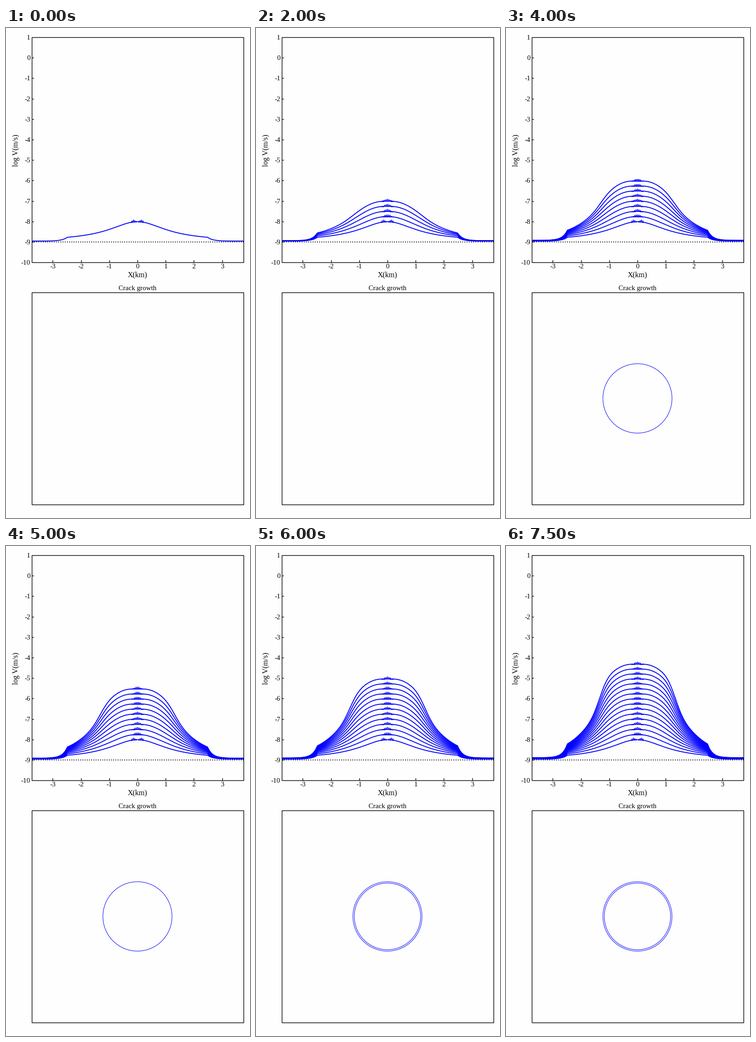
A matplotlib script that plays this animation: 529 px wide and 1058 px high, repeating every 8 s.

```python
import numpy as np
import matplotlib.pyplot as plt
from matplotlib.animation import FuncAnimation
from matplotlib.patches import Circle, Rectangle

W, H, DPI = 529, 1058, 64
PT = 72 / DPI                      # points per pixel
LEFT, RIGHT, TOP, BOTTOM = 55.5, 514.5, 19.9, 506.2
CX = (LEFT + RIGHT) / 2
KM = (RIGHT - LEFT) / 7.5
UNIT = (BOTTOM - TOP) / 11
BASE = TOP + 10 * UNIT             # height of log V = -9
FRAMES, STEP_MS = 16, 500
BLUE = "#0000ff"

plt.rcParams["font.family"] = "Liberation Serif"
fig = plt.figure(figsize=(W / DPI, H / DPI), dpi=DPI, facecolor="#fefefe")
ax = fig.add_axes([0, 0, 1, 1])
ax.set(xlim=(0, W), ylim=(H, 0))
ax.axis("off")


def label(x, y, text, size=15, **kw):
    kw = {"ha": "center", "va": "baseline", **kw}
    ax.text(x, y, text, fontsize=size * PT, color="black", **kw)


def stroke(xs, ys, width=1.4, color="black", **kw):
    return ax.plot(xs, ys, color=color, lw=width * PT, **kw)[0]


def box(top, bottom):
    return ax.add_patch(Rectangle((LEFT, top), RIGHT - LEFT, bottom - top, fill=False,
                                  ec="black", lw=1.4 * PT, zorder=5))


def curve_height(step, d):
    """Slip-rate bell at pixel distance d from the middle; it grows and steepens."""
    d = np.abs(d)
    floor = 1.9 + 0.2 * step
    peak = 43.8 + 11.15 * step - 0.018 * step ** 2
    width = 92 - 17 * np.exp(-step / 1.5)
    power = 2 + 1.7 * (1 - np.exp(-step / 7))
    power = power + 1.4 * (step / 15) ** 1.5 * np.exp(-((d - 75) / 30) ** 2)
    edge = np.exp(-np.maximum(0, d - 152) / 13)
    return BASE - floor - (peak - floor) * edge / (1 + (d / width) ** power)


def make_curve(step):
    d = np.linspace(LEFT - CX, RIGHT - CX, 900)
    line = stroke(CX + d, curve_height(step, d), 1.9, BLUE, zorder=2)
    line.set_clip_path(frame)
    # Short teeth on the crest: two groups on the first curve, then one
    center, spread = (9, 5.5) if step == 0 else (0, 9)
    d = 3.1 * np.arange(-6, 7)
    size = 4.5 * np.exp(-((abs(d) - center) / spread) ** 2)
    d, size = d[size > 0.5], size[size > 0.5]
    y = curve_height(step, d)
    teeth = ax.vlines(CX + d, y + 1.5, y - size, color=BLUE, lw=1.9 * PT, zorder=2)
    return [line, teeth]


def make_ring(radius):
    return ax.add_patch(Circle((CX, 799.8), radius, fill=False, ec=BLUE, lw=PT))


frame = box(TOP, BOTTOM)
box(570.8, 1028.7)

for v in range(-10, 2):
    y = TOP + (1 - v) * UNIT
    if -10 < v < 1:
        stroke([LEFT, LEFT + 4.8], [y, y], solid_capstyle="butt", zorder=5)
    label(52.6, y + 5, str(v), ha="right")
for v in range(-3, 4):
    x = CX + v * KM
    stroke([x, x], [BOTTOM, BOTTOM - 4.8], solid_capstyle="butt", zorder=5)
    label(x, 519.3, str(v))

label(CX, 537, "X(km)", 16)
label(26, 263.8, "log V(m/s)", 16, rotation=90, rotation_mode="anchor")
label(CX, 565.8, "Crack growth")
stroke([LEFT, RIGHT], [BASE, BASE], 1.8, ls=":", zorder=1)

shown_from = [(art, k) for k in range(FRAMES) for art in make_curve(k)]
shown_from += [(make_ring(74.9), 8), (make_ring(71.9), 12)]


def update(k):
    for art, start in shown_from:
        art.set_visible(k >= start)
    return [art for art, _ in shown_from]


anim = FuncAnimation(fig, update, frames=FRAMES, interval=STEP_MS,
                     init_func=lambda: update(0), repeat=True, repeat_delay=0, blit=False)
plt.show()
```
